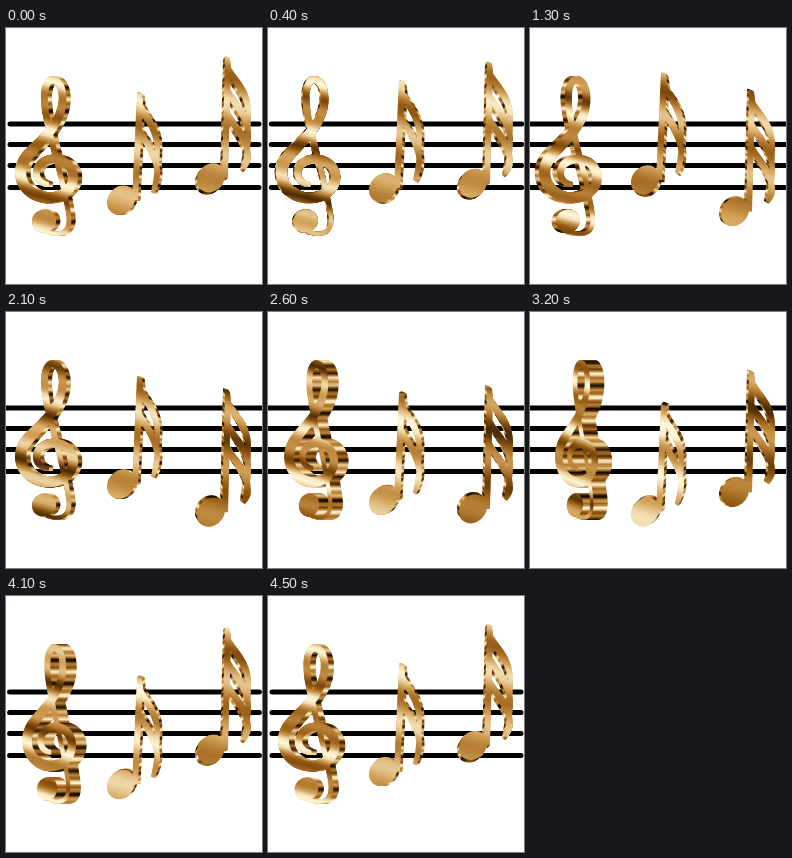
These frames come from a looping animation (256x256 px, 4.6 s). An HTML page with a canvas:

```html
<!DOCTYPE html>
<html>
<head>
<meta charset="utf-8">
<title>Golden notes</title>
<style>
html, body { margin: 0; width: 100%; height: 100%; overflow: hidden; background: #fff; }
canvas { display: block; width: 256px; height: 256px; }
</style>
</head>
<body>
<canvas id="stage" width="256" height="256"></canvas>
<script>
const ctx = document.getElementById('stage').getContext('2d');
const LOOP = 4600, STEP = 100, TAU = 2 * Math.PI, DEG = Math.PI / 180;
const { sin, cos } = Math;
const mix = (a, b, t) => a + (b - a) * t;

const RAMP = [[22, 11, 2], [148, 88, 16], [208, 158, 84], [255, 246, 214]];

function gold(v) {
  const p = Math.max(0, Math.min(0.999, v)) * 3, i = Math.floor(p);
  return `rgb(${RAMP[i].map((a, k) => Math.round(mix(a, RAMP[i + 1][k], p - i)))})`;
}

function gradient(x0, y0, x1, y1, n, shade) {
  const g = ctx.createLinearGradient(x0, y0, x1, y1);
  for (let i = 0; i <= n; i++) g.addColorStop(i / n, gold(shade(i / n)));
  return g;
}

// Horizontal streaks on the sides of a shape
const streaks = (top, height, phase) => gradient(0, top, 0, top + height, 80, u =>
  0.48 + 0.3 * sin(u * 47 + phase) + 0.28 * sin(u * 131 - phase * 2));

// Clef centre line: a spiral followed by four curves, each point with a width
function spiral() {
  const pts = [];
  for (let a = 100; a < 585; a += 6) {
    const u = (a - 100) / 485, r = 11 + 22 * u;
    pts.push([2 + r * cos(a * DEG), 147 + 0.85 * r * sin(a * DEG), 4 + 8 * Math.sqrt(u)]);
  }
  return pts;
}

function curve(a, b, c, d, w0, w1) {
  const pts = [];
  for (let t = 0; t < 1; t += 0.05) {
    const at = k => mix(mix(mix(a[k], b[k], t), mix(b[k], c[k], t), t),
                        mix(mix(b[k], c[k], t), mix(c[k], d[k], t), t), t);
    pts.push([at(0), at(1), mix(w0, w1, t)]);
  }
  return pts;
}

function ribbon(pts) {
  const left = [], right = [];
  pts.forEach(([x, y, w], i) => {
    const a = pts[Math.max(0, i - 1)], b = pts[Math.min(pts.length - 1, i + 1)];
    const dx = b[0] - a[0], dy = b[1] - a[1], k = w / 2 / (Math.hypot(dx, dy) || 1);
    left.push([x - dy * k, y + dx * k]);
    right.unshift([x + dy * k, y - dx * k]);
  });
  return left.concat(right);
}

function polygon(path, pts) {
  pts.forEach(([x, y], i) => i ? path.lineTo(x, y) : path.moveTo(x, y));
  path.closePath();
}

function makeClef() {
  const neck = [14, 70], loopEnd = [-4, 80], foot = [20, 185];
  const body = new Path2D(), ball = new Path2D();
  polygon(body, ribbon([
    ...spiral(),
    ...curve([-21.4, 127.2], [-12, 115], [14, 98], neck, 12, 8),
    ...curve(neck, [14, 46], [-9, 42], loopEnd, 8, 7),
    ...curve(loopEnd, [0, 110], [12, 140], foot, 7, 5),
    ...curve(foot, [24, 208], [8, 208], [-5, 203], 5, 4)
  ]));
  ball.ellipse(-5, 193, 12.5, 11.5, -0.3, 0, TAU);
  return [body, ball];
}

function flag(path, x, y, w, end) {
  const r = x + w, mid = (y + 55 + end) / 2;
  path.moveTo(x, y);
  path.bezierCurveTo(x + 4, y + 19, r, y + 28, r, y + 55);
  path.quadraticCurveTo(r, mid, r - 6, end);
  path.lineTo(r - 9, end - 2);
  path.quadraticCurveTo(r - 4, mid, r - 5, y + 58);
  path.bezierCurveTo(r - 6, y + 38, x + 5, y + 29, x, y + 13);
  path.closePath();
}

// The top of the stem is the point 0,0
function makeNote(lean, headY, flags, gap, w, end) {
  const p = new Path2D();
  polygon(p, [[-1, 0], [4, 2], [5, 10], [3 - lean, headY], [-3 - lean, headY]]);
  p.ellipse(-14 - lean, headY, 15.5, 13, -0.9, 0, TAU);
  for (let i = 0; i < flags; i++) flag(p, 0, i * gap, w, end);
  return p;
}

const clef = makeClef();
const midNote = [makeNote(3, 108, 2, 26, 22, 102)];
const endNote = [makeNote(1, 122, 3, 23, 25, 114)];

// Stacked layers from back to front give the shape its thickness
function extrude(paths, x, y, dx, dy, squash, layers, side, face) {
  for (let i = layers; i >= 0; i--) {
    const k = i / layers;
    ctx.save();
    ctx.translate(x + dx * k, y + dy * k);
    ctx.scale(squash, 1);
    ctx.fillStyle = i ? side : face;
    for (const p of paths) ctx.fill(p);
    ctx.restore();
  }
}

function drawClef(s, phase) {
  const turn = (17 - 32 * s) * DEG, depth = 19 * sin(turn);
  const axis = 46 - 7.5 * s + 2 * s * s;
  const face = gradient(20, 50, -20, 208, 40, u =>
    0.6 + 0.27 * sin(u * 22 + phase) + 0.2 * sin(u * 41 - phase));
  extrude(clef, axis - depth / 2, 0, depth, 0, cos(turn), 18,
    streaks(45, 165, phase * 2), face);
}

function drawNote(note, x, y, dx, dy, height, light, phase) {
  const face = gradient(10, 0, -26, height, 24, u =>
    light + (0.34 - 0.24 * u) * sin(u * 17 + phase));
  extrude(note, x, y, dx, dy, 1, 6, streaks(0, height, phase), face);
}

function drawStave(c) {
  const inset = 1 + 3 * c;
  ctx.strokeStyle = '#000';
  ctx.lineWidth = 5;
  ctx.lineCap = 'round';
  ctx.beginPath();
  for (let i = 0; i < 4; i++) {
    const y = 96 + 20 * i + 0.4 * i * i;
    ctx.moveTo(inset, y);
    ctx.lineTo(257 - inset, y);
  }
  ctx.stroke();
}

function draw(ms) {
  const phase = TAU * (ms + 100) / LOOP, s = sin(phase), c = cos(phase);
  ctx.fillStyle = '#fff';
  ctx.fillRect(0, 0, 256, 256);
  drawStave(c);
  drawClef(s, phase);
  drawNote(midNote, 132, 67.5 - 25 * s, 2.5, 2.5 * s, 123, 0.68 - 0.13 * s, phase);
  drawNote(endNote, 220, 53 - 25.5 * c, -2, 2.5 * c, 137,
    0.54 + 0.15 * cos(phase - 0.8), phase + 2);
}

const start = performance.now();
function tick() {
  const t = (performance.now() - start) % LOOP;
  draw(Math.floor(t / STEP) * STEP);
  requestAnimationFrame(tick);
}
tick();
</script>
</body>
</html>
```
